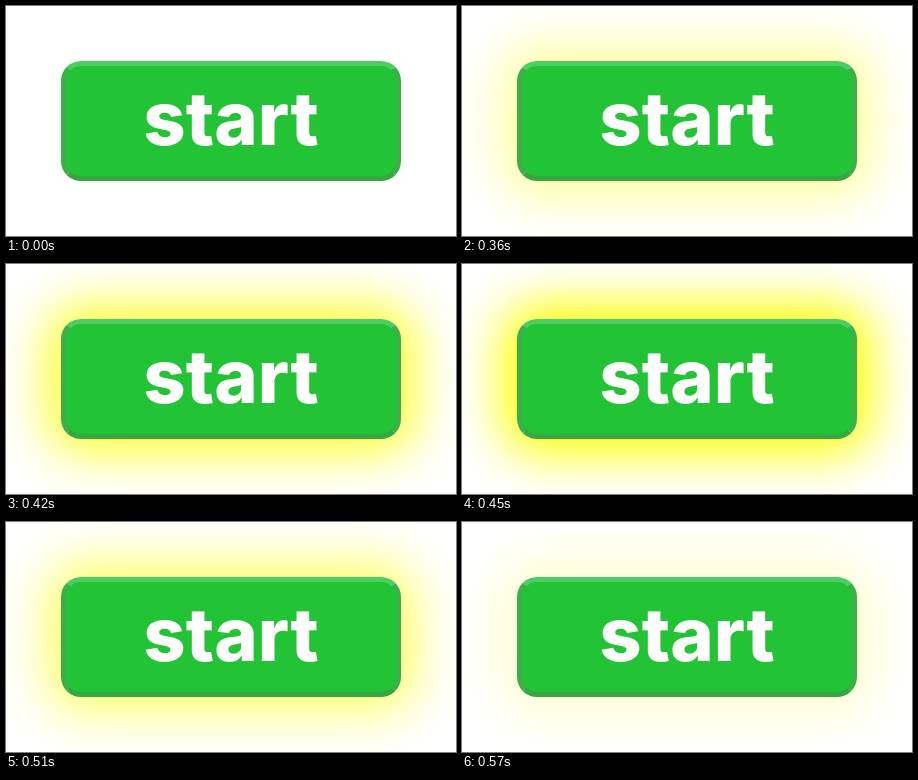
Write an HTML page that moves like this. It is 450 px wide and 230 px high and loops after 0.6 s.

```html
<!DOCTYPE html>
<html lang="en">
<head>
<meta charset="utf-8">
<title>Start button</title>
<style>
  html, body { margin: 0; width: 100%; height: 100%; overflow: hidden; background: #fff; }
  #glow, #button {
    position: absolute; left: 55px; top: 55px; width: 340px; height: 120px;
    box-sizing: border-box; border-radius: 20px;
  }
  #glow { box-shadow: 0 0 50px 15px #ff0; opacity: 0; }
  #button {
    background: #22c435; border: 5px solid;
    border-color: #4bcf62 #39b147 #38a743;
  }
  svg { position: absolute; left: 0; top: 0; }
  text { font: 760 74px Inter, sans-serif; font-optical-sizing: none; fill: #fff; text-anchor: middle; }
</style>
</head>
<body>
<div id="glow"></div>
<div id="button"></div>
<svg width="450" height="230"><text x="225" y="138.5">start</text></svg>
<script>
  const LOOP = 600, STEP = 30, PEAK = 15, LEVELS = 5;
  const glow = document.getElementById('glow');

  // The glow climbs in five hard steps, then descends the same way.
  function draw() {
    const step = Math.floor(performance.now() % LOOP / STEP);
    glow.style.opacity = Math.max(0, LEVELS - Math.abs(step - PEAK)) / LEVELS;
    requestAnimationFrame(draw);
  }
  draw();
</script>
</body>
</html>
```
